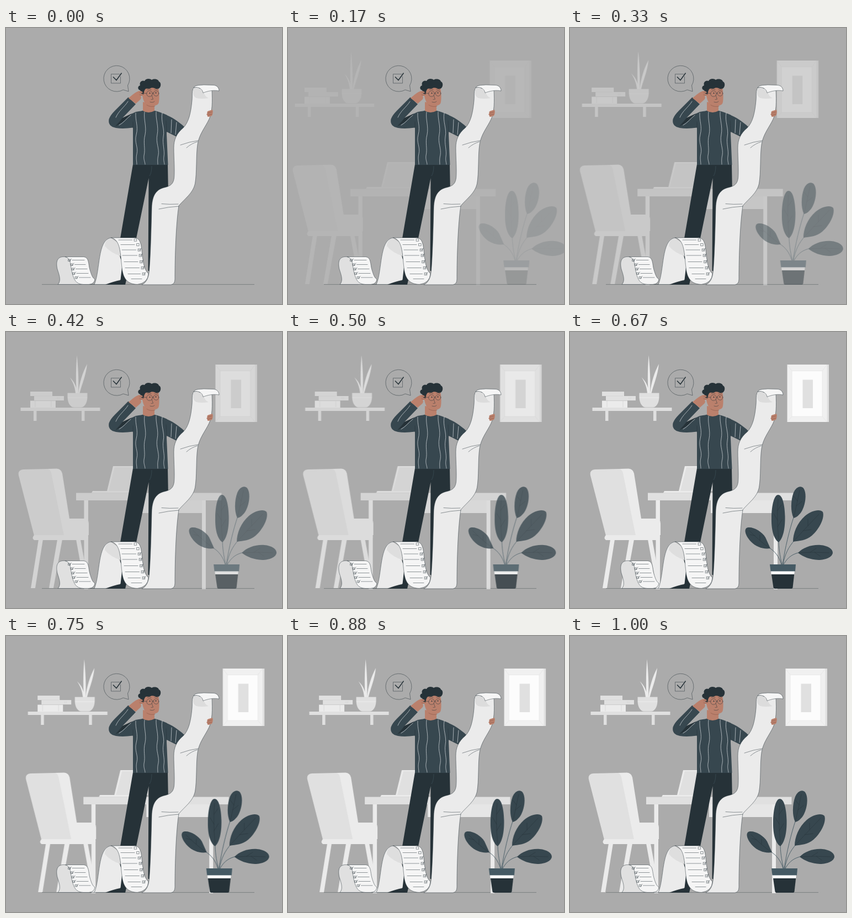
These frames come from a looping animation (500 px wide and 500 px high, 1040 ms). An HTML page:

```html
<!DOCTYPE html>
<html lang="en">
<head>
<meta charset="utf-8">
<title>Checklist</title>
<style>
  html, body { margin: 0; width: 100%; height: 100%; overflow: hidden; background: #ababab; }
  svg { display: block; width: 100vw; height: 100vh; }

  /* 24 poses per second: slide in, overshoot by 3px, settle */
  .slide { animation: slide 1040ms infinite, fade 1040ms infinite; }
  .room { --far: -25.2px; --over: 3px; }
  .plant { --far: 25.2px; --over: -3px; }
  @keyframes slide {
    0% { transform: translateX(var(--far)); animation-timing-function: step-end; }
    15.58% { transform: translateX(var(--far)); animation-timing-function: steps(12); }
    63.65% { transform: translateX(var(--over)); animation-timing-function: steps(8); }
    95.67%, 100% { transform: translateX(0); }
  }
  @keyframes fade {
    0% { opacity: 0; animation-timing-function: step-end; }
    15.58% { opacity: .16; animation-timing-function: steps(11); }
    59.64%, 100% { opacity: 1; }
  }

  .e0 { fill: #e0e0e0; }
  .eb { fill: #ebebeb; }
  .f5 { fill: #f5f5f5; }
  .dark { fill: #263238; }
  .knit { fill: #37474f; }
  .skin { fill: #ba806c; }
  .line { fill: none; stroke: #263238; stroke-width: .5; stroke-linecap: round; stroke-linejoin: round; }
  .crease { fill: none; stroke: #7c4f41; stroke-width: .5; stroke-linecap: round; }
  .yarn { fill: none; stroke: #e6eaec; stroke-width: .65; stroke-linecap: round; }
  .paper { stroke: #263238; stroke-width: .5; stroke-linejoin: round; }
</style>
</head>
<body>
<svg viewBox="0 0 500 500">
  <path d="M65 464.600H450" stroke="#4b5357" stroke-width=".5"/>

  <g class="slide room">
    <!-- shelf -->
    <path class="e0" d="M37.500 137H181.500V143H153.500V161H148V143H66.500V161H61V143H37.500Z"/>
    <path class="e0" d="M55 108H95V116H55ZM62 116H116V124H62Z"/>
    <path class="eb" d="M55 124.500H101V137H55Z"/>
    <path d="M62 116H93M104 118V122M107 118V122M64 125V136M93 125V136" stroke="#d2d2d2" stroke-width=".7"/>
    <path class="eb" d="M139 111C137 88 138 62 139.500 42C142 66 143 90 142 111ZM142 111C144 91 150 73 158 58C156 79 148 96 144.500 111ZM137 111C136 99 132 90 126.500 82C134 89 139 98 140 111Z"/>
    <path class="e0" d="M122.500 110.500H158.500V119C158 129 153 136.500 147 136.500H134C128 136.500 123 129 122.500 119Z"/>
    <path d="M123 119H158" stroke="#ededed"/>

    <!-- picture -->
    <path class="e0" d="M460 59H466V163H460Z"/>
    <path fill="#f0f0f0" d="M390.500 59H462.500V163H390.500Z"/>
    <path d="M390.500 59L399 70.500M462.500 59L454 70.500M390.500 163L399 153M462.500 163L454 153" stroke="#e2e2e2" stroke-width=".7"/>
    <path fill="#fcfcfc" stroke="#e6e6e6" stroke-width=".7" d="M399 70.500H454V153H399Z"/>
    <path class="e0" d="M418.500 86.500H437V138H418.500Z"/>

    <!-- desk and laptop -->
    <path fill="#e6e6e6" d="M252 304H368V328H252Z"/>
    <path class="eb" d="M152.500 304H160V466H152.500ZM366 304H373V466H366Z"/>
    <path class="e0" d="M138 291.500H401.500V305H138Z"/>
    <path class="eb" d="M205 243H255V288H194Z"/>
    <path class="e0" d="M208 245H255V288H197Z"/>
    <path class="eb" d="M168 288H250V291.500H166Z"/>

    <!-- chair -->
    <path class="eb" d="M70 376H78L64 464H56ZM104 376H113L97 464H89ZM138 376H146L162 464H154Z"/>
    <path class="eb" d="M86 248L103 247.500Q111 248 113 256L126 338H153Q161 338 161 347V368H112Z"/>
    <path class="e0" d="M34 260Q32 250 42 249L86 248Q91 248 93 256L116 369H62Z"/>
    <path class="eb" d="M62 368H159Q162 372 158 377H62Q57 373 62 368Z"/>
  </g>

  <g class="slide plant">
    <g fill="none" stroke="#455a64" stroke-width=".9">
      <path d="M386 421C382 407 374 397 364 391M387 421C383 405 381 390 381 376M388 421C393 390 400 360 409 333M389 421C392 403 399 389 410 377M390 421C398 407 407 402 420 399"/>
    </g>
    <g class="knit">
      <path d="M366 392C352 394 340 389 331 380C321 370 317 357 324 354.500C334 352 350 361 357 372Z"/>
      <path d="M381 381C371 374 367.500 356 368 336C368.500 313 373 295 380 295C388 295 392 313 392.500 334C393 356 389 374 381 381Z"/>
      <path d="M408 337C402 325 403 304 408 291C412 281 421 277 426 283C433 293 429 315 422 326C418 332 413 336 408 337Z"/>
      <path d="M407 380C407 365 414 346 429 333C441 323 456 320 461 326C465 337 454 358 441 369C430 378 419 378 407 380Z"/>
      <path d="M416 400C426 390 441 385 457 386C470 387 479 393 479 400C478 408 466 413 453 413C438 412 426 408 416 400Z"/>
    </g>
    <g class="line">
      <path d="M364 391Q347 379 328 360M381 376Q377 335 380 303M409 333Q415 307 419 287M409 378Q431 354 454 330M418 400Q445 398 472 400"/>
      <path d="M347 377L347 368M338 369L329 367M379 353L387 340M379 341L372 329M379 323L386 313M413 315L423 307M415 306L409 298M425 360L440 358M434 351L434 339M438 399L449 392M446 399L456 406"/>
    </g>
    <path class="dark" d="M367 432H410L406.500 463Q406 465 404 465H374Q372 465 371.500 463Z"/>
    <path fill="#fff" d="M367 433H410L409.400 439H367.600Z"/>
    <path fill="#455a64" d="M365 421H412L411 433.500H366.500Z"/>
  </g>

  <!-- thought bubble -->
  <path class="line" d="M212 112.200A23.500 23.500 0 1 1 220.500 104L222 114.500Z"/>
  <path class="line" d="M206 83.500H190.500V100H207.500V88"/>
  <path d="M194 88.500L200 94.500L209.500 81.500" fill="none" stroke="#263238" stroke-width="1.500"/>

  <!-- man -->
  <path class="dark" d="M230 247H293L294 300L270 440H257.500L258.500 272L236 381L216 465H180Q195 459 207 457V381Z"/>
  <path d="M264 250Q264 262 260 268" fill="none" stroke="#455a64" stroke-width=".5"/>
  <path class="knit" d="M289 157C300 161 312 169 323 179L313 199L289 187Z"/>
  <path class="knit" d="M221.500 125.500L235 138L211 163L235 152Q247 150 249 149.500H268Q282 153 292 158L291 192L293.500 248H230V180.500Q212 183 199 181Q184 178 186.500 165Q189 158 197 150Z"/>
  <path class="dark" d="M228 155L211 163Q206 170 198 178Q212 172 228 155Z"/>
  <path class="line" d="M230 181V170M291 188L290 168"/>
  <g class="yarn">
    <path d="M235 154C234 168 240 178 236 193C232 208 240 215 237 228C235 237 237 241 237 247"/>
    <path d="M251 152C249 166 255 178 252 193C248 208 253 218 250 231C249 239 252 243 252 247"/>
    <path d="M272 152C271 166 277 178 274 193C271 208 278 218 276 230C274 238 275 243 275 247"/>
    <path d="M283 154C280 170 288 182 285 197C283 210 288 222 286 233C285 240 287 244 287 247"/>
    <path d="M221 133C214 144 204 150 199 162M226 158C218 164 213 172 205 176M300 166L299 190M309 171L307 193"/>
  </g>

  <path class="skin" d="M248 134L248 150Q258 156 269 150V138Z"/>
  <path class="skin" d="M247 107C256 102 270 102 276 107C278 118 278 130 276.500 136C274 142 262 142 256 140C249 136 245 122 247 107Z"/>
  <path class="crease" d="M255 139.500Q262 144 270 141.500"/>
  <path class="dark" d="M246.500 120C243 118 243 115 243.500 113C238 112 238 105 243 104C241 98 246 94 251 96C253 91 261 91 264 94C269 91 276 93 277 97C282 99 281 108 276 110C271 111 268 107 263 108.500C259 111 255 109 252.500 110.500C250 113 250 117 249 121Z"/>
  <path class="skin" d="M222 127C228 122 234 116 241 114Q247 114 248 117L243 119Q250 119 249 122L244 123Q246 127 243 130L235 137Z"/>
  <path class="crease" d="M242 117L249 119M242 121L247 122"/>
  <g class="line">
    <circle cx="260" cy="119" r="5.300"/>
    <circle cx="272" cy="118.500" r="4.800"/>
    <path d="M249 118L254.700 118.500M265.200 118Q266 117 267.300 118M256 111.500Q260 109.500 263 111.500M269 111Q272 109.500 275 111.500M264 122L266.500 129L263 129.500M261 134Q266 136 269 133"/>
  </g>
  <circle class="dark" cx="260.500" cy="118" r="1"/>
  <circle class="dark" cx="271.500" cy="117.500" r="1"/>

  <!-- tall sheet -->
  <path class="paper eb" d="M340 108C336 115 338 121 337 131C335 154 331 171 321 181C309 191 304 202 304 217C304 237 306 258 304.500 272C303 284 296 287 285 289.500C270 294 265 306 264 325C263 365 262 410 259.500 440Q258 460 246 465H299Q306 464 306 455C306 412 308 355 313 322C324 309 339 299 342.500 282C346 262 344 232 347 211C350 192 361 180 368 165C374 152 374 133 373 112Z"/>
  <path d="M340 109C337 117 339 124 345 127Q354 129 367 127Q360 124 358 116L347 107Z" fill="#dcdcdc"/>
  <path class="paper f5" d="M340 108C343 103 350 104 358 103L376 103.500C382 104 386 108 386 114C376 112 366 114 357 117.500C356 110 348 106 340 108Z"/>
  <path class="line" d="M316 212Q332 206 348 204M327 217Q336 209 347 206M282 318.500Q296 320 312 319M277 328Q294 324 313 323"/>
  <path class="skin" d="M374 148L366 150.500Q363 152.500 365 154L364.500 154.800Q362 157 365 158Q364 161 367 161L373 159Q376 153 374 148Z"/>
  <path class="crease" d="M365 154.500L373 152M365 158L373 156"/>

  <!-- small folds -->
  <path class="e0" d="M107 414.500C92 413 90 424 93 437C97 449 100 458 94 464.500H140L119 420Z"/>
  <path class="line" d="M107 414.500C92 413 90 424 93 437C97 449 100 458 94 464.500H140"/>
  <path class="eb" d="M140 464.500H160C171 441 165 383 190 380L211 425L207.500 456Q192 460 180 464.500Z"/>
  <path d="M190 380C182 381 179 389 179 395Q190 408 208 413L204 390Z" fill="#dedede"/>
  <path class="line" d="M140 464.500H210M160 464.500C171 441 165 383 190 380"/>
  <path class="paper f5" d="M107 414.500H141C151 416 149 428 152 438C155 448 157 453 161 455Q160 464 150 464.500H140C126 464 123 455 120 444C116 431 119 417 107 414.500Z"/>
  <path class="paper f5" d="M190 380H234C247 382 245 402 248 419C250 434 253 440 258 445Q257 462 238 464.500C219 464 212 453 210 434C207 410 208 383 190 380Z"/>
  <path id="list" class="line"/>
</svg>
<script>
  const box = (x, y, s) => `M${x} ${y}h${s}v${s}h${-s}z`;
  const tick = (x, y) => `M${x + 1} ${y + 1.5}l1.5 1.5l3 -4`;
  const rule = (x1, x2, y) => `M${x1} ${y}H${x2}`;

  // box x, rule end, y
  const left = [[113, 142, 419], [117.5, 144, 427], [119.5, 147, 435], [121, 149, 443], [125.5, 153, 450.5]];
  // rule start, box x, y
  const right = [[204, 232.5, 382], [208, 237, 390.5], [210, 239.5, 400], [211, 241.5, 410],
                 [214, 243, 421.5], [216, 245.5, 432.5], [221, 247.5, 443.5]];

  let d = rule(227, 246, 454.5);
  for (const [x, end, y] of left) d += box(x, y, 3.5) + tick(x, y) + rule(x + 7, end, y + 1.5);
  right.forEach(([x, bx, y], i) => {
    d += box(bx, y, 4.2) + rule(x, bx - 4, y + 2);
    if (i > 1) d += tick(bx, y);
  });
  document.getElementById('list').setAttribute('d', d);
</script>
</body>
</html>
```
